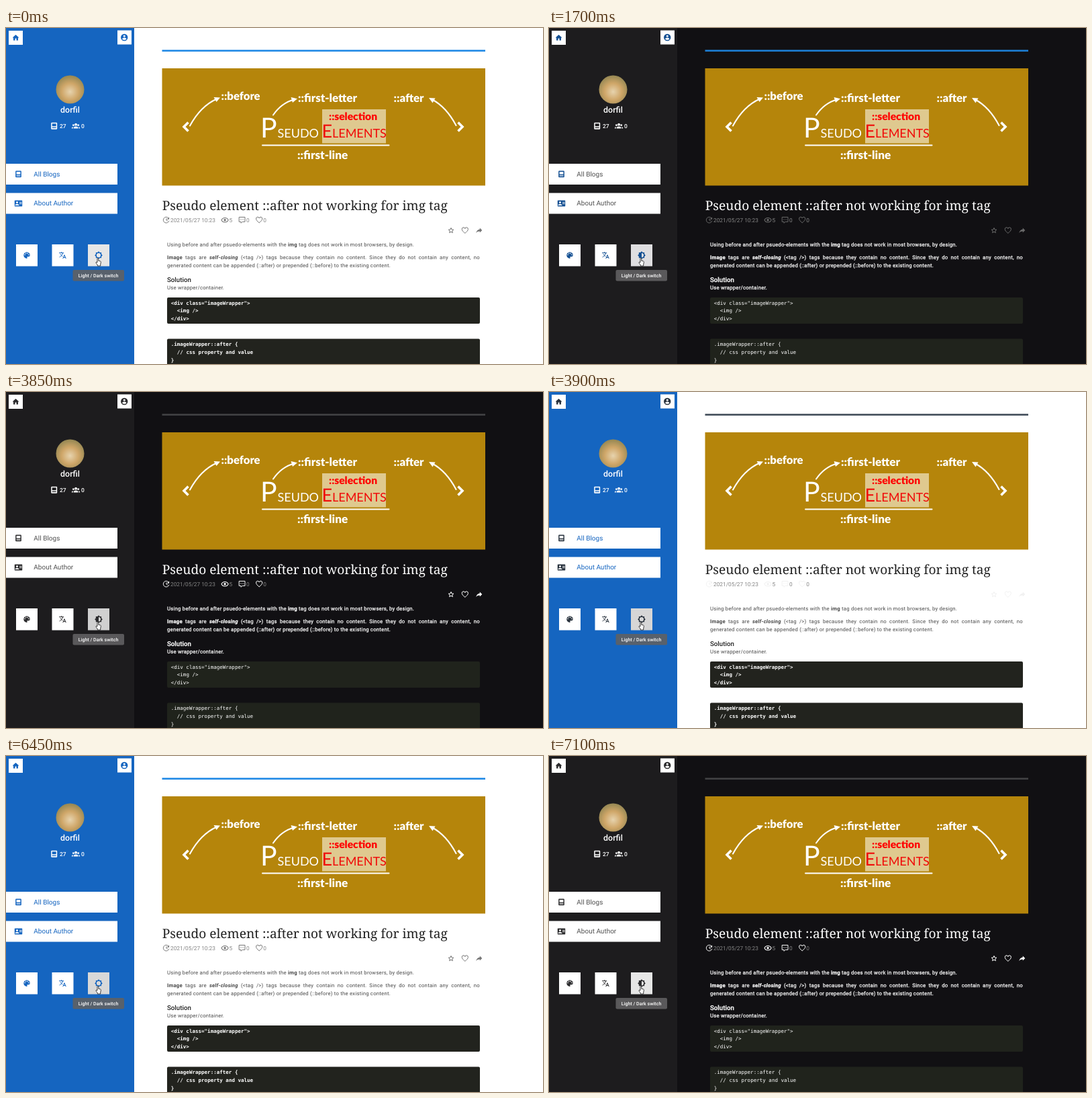
An HTML page that plays this animation: 800x500 px, repeating every 8000 ms.

```html
<!DOCTYPE html>
<html lang="en">
<head>
<meta charset="utf-8">
<title>Blog theme switch</title>
<style>
@property --icon { syntax: '<color>'; inherits: true; initial-value: #1565c0; }
@property --bar { syntax: '<color>'; inherits: true; initial-value: #1e88e5; }
@property --tool { syntax: '<color>'; inherits: true; initial-value: #757575; }
@property --btn { syntax: '<color>'; inherits: true; initial-value: #e6e6e6; }

html, body { margin: 0; width: 100%; height: 100%; overflow: hidden; }
.stage {
  position: relative; width: 800px; height: 500px; overflow: hidden;
  background: var(--page);
  font-family: Roboto, sans-serif;
  text-rendering: geometricPrecision;
  animation: theme 8s step-end infinite, fade 8s linear infinite, press 8s linear infinite;
}
svg { position: absolute; left: 0; top: 0; display: block; }

/* instant part of the switch */
@keyframes theme {
  0%, 48.75% {
    --page: #fff; --side: #1565c0; --menu: #1565c0; --head: #212121;
    --body: #484848; --meta: #858585; --code: #22231e; --tip: #58616c;
    --half: 0; --heavy: 0px; --mono: 700;
  }
  21.25%, 81.875%, 100% {
    --page: #111013; --side: #1d1c1e; --menu: #505050; --head: #fff;
    --body: #fff; --meta: #858585; --code: #20231c; --tip: #5a595b;
    --half: 1; --heavy: .25px; --mono: 400;
  }
}
/* eased part of the switch */
@keyframes fade {
  0%, 21.24% { --icon: #1565c0; --bar: #1e88e5; --tool: #757575; }
  21.25% { --icon: #134f93; --bar: #1d80d8; --tool: #686868; animation-timing-function: cubic-bezier(.25,.8,.5,1); }
  25%, 48.74% { --icon: #2c2c2e; --bar: #424244; --tool: #fff; }
  48.75% { --icon: #29323d; --bar: #3f4a55; --tool: #f2f2f2; animation-timing-function: cubic-bezier(.25,.8,.5,1); }
  52.5%, 81.87% { --icon: #1565c0; --bar: #1e88e5; --tool: #757575; }
  81.875% { --icon: #134f93; --bar: #1d80d8; --tool: #686868; animation-timing-function: cubic-bezier(.25,.8,.5,1); }
  85.625%, 100% { --icon: #2c2c2e; --bar: #424244; --tool: #fff; }
}
/* button press */
@keyframes press {
  0%, 19.3%, 28.1%, 47.4%, 55.6%, 80%, 88.7%, 100% { --btn: #e6e6e6; }
  20.625% { --btn: #d7d7d7; }
  21.25% { --btn: #dfdee0; }
  48.125% { --btn: #d0d0d0; }
  48.75% { --btn: #d6d6d6; }
  80.625% { --btn: #d8d8d8; }
  81.25% { --btn: #d0d0d0; }
  81.875% { --btn: #dcdcdc; }
}

.ico { color: var(--icon); fill: currentColor; }
.tool { color: var(--tool); fill: currentColor; }
.white { color: #fff; fill: #fff; }
.line { fill: none; stroke: currentColor; stroke-width: 2; }
.menu { font-size: 10px; fill: var(--menu); }
.stat { font-size: 8.5px; font-weight: 500; fill: #fff; }
.meta { font-size: 8.3px; fill: var(--meta); }
.title { font: 19.15px 'Noto Serif', serif; fill: var(--head); }
.body, .para { font-size: 7.75px; letter-spacing: .029em; }
.body { fill: var(--body); stroke: var(--body); stroke-width: var(--heavy); }
.head { font-size: 9.7px; font-weight: 500; fill: var(--head); stroke: var(--head); stroke-width: var(--heavy); }
.code { font: 7.54px 'DejaVu Sans Mono', monospace; font-weight: var(--mono); fill: #fff; }
.tag { font-family: Lato, sans-serif; font-weight: 900; fill: #fff; }
.caps { font: 18px Lato, sans-serif; }
.draw { fill: none; stroke: #fff; stroke-width: 2; stroke-linecap: round; }
.para {
  position: absolute; left: 240px; top: 336.4px; width: 466px; line-height: 11.6px;
  color: var(--body); -webkit-text-stroke: var(--heavy) var(--body);
}
.para div { white-space: nowrap; }
.para .full { white-space: normal; height: 11.6px; text-align: justify; text-align-last: justify; }
</style>
</head>
<body>
<div class="stage">
<svg width="800" height="500" viewBox="0 0 800 500">
  <defs>
    <radialGradient id="fur" cx=".5" cy=".58" r=".55">
      <stop offset="0" stop-color="#e6d3ae"/>
      <stop offset=".55" stop-color="#cfa668"/>
      <stop offset="1" stop-color="#9a8a55"/>
    </radialGradient>
    <symbol id="home" viewBox="0 0 24 24"><path d="M10 20V14H14V20H19V12H22L12 3L2 12H5V20Z"/></symbol>
    <symbol id="user" viewBox="0 0 24 24">
      <path fill-rule="evenodd" d="M12 2A10 10 0 0 1 12 22A10 10 0 0 1 12 2M12 5A3 3 0 0 0 12 11A3 3 0 0 0 12 5M12 19.2C14.5 19.2 16.7 17.9 18 16C18 14 14 12.9 12 12.9S6 14 6 16C7.3 17.9 9.5 19.2 12 19.2"/>
    </symbol>
    <symbol id="post" viewBox="0 0 24 24">
      <path fill-rule="evenodd" d="M5 2H19Q21 2 21 4V20Q21 22 19 22H5Q3 22 3 20V4Q3 2 5 2M6 5V13H18V5ZM6 16V18.5H18V16Z"/>
    </symbol>
    <symbol id="card" viewBox="0 0 24 24">
      <path fill-rule="evenodd" d="M2 3H22Q24 3 24 5V19Q24 21 22 21H2Q0 21 0 19V5Q0 3 2 3M8 6A3 3 0 0 0 8 12A3 3 0 0 0 8 6M2 18H14V17C14 15 10 13.9 8 13.9S2 15 2 17ZM15 8V10H22V8ZM15 12V14H22V12Z"/>
    </symbol>
    <symbol id="group" viewBox="0 0 24 24">
      <circle cx="12" cy="8.5" r="3.7"/><circle cx="5" cy="10.3" r="2.7"/><circle cx="19" cy="10.3" r="2.7"/>
      <path d="M5.5 20V18.2C5.5 16 8.4 14.2 12 14.2S18.5 16 18.5 18.2V20ZM0 20V18.5C0 17 1.9 15.9 4.4 15.6Q3.5 16.8 3.5 18.2V20ZM24 20V18.5C24 17 22.1 15.9 19.6 15.6Q20.5 16.8 20.5 18.2V20Z"/>
    </symbol>
    <symbol id="palette" viewBox="0 0 24 24">
      <path d="M12 3A9 9 0 0 0 12 21A1.5 1.5 0 0 0 13.1 18.5A1.5 1.5 0 0 1 14.2 16H16A5 5 0 0 0 21 11C21 6.6 17 3 12 3"/>
      <g fill="#fff"><circle cx="6.5" cy="10.5" r="1.5"/><circle cx="9.5" cy="6.5" r="1.5"/><circle cx="14.5" cy="6.5" r="1.5"/><circle cx="17.5" cy="10.5" r="1.5"/></g>
    </symbol>
    <symbol id="lang" viewBox="0 0 24 24">
      <path class="line" d="M1 5H15M8 2V5M12.5 5C11.5 10 7 14.5 2.5 18M5 8.5C6.5 11.5 9 14 11.5 15.5M12.5 22L17 11L21.5 22M14 18.5H20"/>
    </symbol>
    <symbol id="sun" viewBox="0 0 24 24">
      <path fill-rule="evenodd" d="M20 15.3L23.3 12L20 8.7V4H15.3L12 .7L8.7 4H4V8.7L.7 12L4 15.3V20H8.7L12 23.3L15.3 20H20ZM12 6A6 6 0 0 1 12 18A6 6 0 0 1 12 6"/>
    </symbol>
    <symbol id="update" viewBox="0 0 24 24">
      <path class="line" d="M20.5 14A9 9 0 1 1 18.5 5.8M12.5 7V12.5L16.5 15"/><path d="M21 3V10H14Z"/>
    </symbol>
    <symbol id="eye" viewBox="0 0 24 24">
      <path class="line" d="M2 12C5.5 3.5 18.5 3.5 22 12C18.5 20.5 5.5 20.5 2 12Z"/><circle cx="12" cy="12" r="3.3"/>
    </symbol>
    <symbol id="chat" viewBox="0 0 24 24">
      <path class="line" d="M3 3H21V17H13L9 21V17H3Z"/><path d="M6.5 9H8.5V11H6.5ZM11 9H13V11H11ZM15.5 9H17.5V11H15.5Z"/>
    </symbol>
    <symbol id="heart" viewBox="0 0 24 24">
      <path class="line" d="M12 20C6 14.7 3 12 3 8.5A4.5 4.5 0 0 1 12 6.3A4.5 4.5 0 0 1 21 8.5C21 12 18 14.7 12 20Z"/>
    </symbol>
    <symbol id="star" viewBox="0 0 24 24">
      <path class="line" d="M12 4.4L14.2 9.5L19.7 10L15.5 13.6L16.8 19L12 16.2L7.2 19L8.5 13.6L4.3 10L9.8 9.5Z"/>
    </symbol>
    <symbol id="share" viewBox="0 0 24 24"><path d="M21 12L14 5V9C7 10 4 15 3 20C5.5 16.5 9 14.9 14 14.9V19Z"/></symbol>
  </defs>

  <!-- sidebar -->
  <rect width="191" height="500" fill="var(--side)"/>
  <g fill="#fff">
    <rect x="4" y="4" width="21" height="21"/>
    <rect x="166" y="3.5" width="21" height="21"/>
    <rect y="202" width="166" height="31"/>
    <rect y="245.5" width="166" height="31"/>
    <rect x="15" y="322" width="32" height="32.5"/>
    <rect x="68.5" y="322" width="32" height="32.5"/>
  </g>
  <rect x="122" y="322" width="32" height="32.5" fill="var(--btn)"/>
  <circle cx="95.5" cy="91.5" r="21" fill="url(#fur)"/>
  <text x="95.5" y="125.5" text-anchor="middle" font-size="12.4" font-weight="500" fill="#fff">dorfil</text>
  <g class="white">
    <use href="#post" x="65.7" y="139.7" width="12" height="12"/>
    <use href="#group" x="97.8" y="139.2" width="12.5" height="12.5"/>
  </g>
  <text class="stat" x="80" y="148.5">27</text>
  <text class="stat" x="112" y="148.5">0</text>
  <g class="ico">
    <use href="#home" x="8.5" y="8.5" width="12" height="12"/>
    <use href="#user" x="170" y="7.8" width="12.5" height="12.5"/>
    <use href="#post" x="12.7" y="211.5" width="11.6" height="11.6"/>
    <use href="#card" x="12.5" y="255" width="12" height="12"/>
    <use href="#palette" x="24.7" y="332" width="12.5" height="12.5"/>
    <use href="#lang" x="78.5" y="332.2" width="12" height="12"/>
    <use href="#sun" x="131.8" y="332" width="12.4" height="12.4"/>
    <rect x="134.6" y="334.8" width="3.4" height="6.8" style="opacity:var(--half)"/>
  </g>
  <text class="menu" x="41.3" y="220.8">All Blogs</text>
  <text class="menu" x="41.3" y="264.3">About Author</text>
  <rect x="99.5" y="360" width="76.5" height="16.5" rx="2" fill="var(--tip)"/>
  <text x="107.8" y="370.6" font-size="7.1" font-weight="500" fill="#fff">Light / Dark switch</text>
  <path d="M136 349V343.3Q136 342.3 136.9 342.3T137.8 343.3V346.3L140.5 347Q141.5 347.3 141.4 348.5L140.7 352V354H136.3V352.5L134 349.5Q133.8 348.2 135 348.3Z" fill="#fff" stroke="#111" stroke-width=".8" stroke-linejoin="round"/>

  <!-- banner -->
  <rect x="232.5" y="32.5" width="481.5" height="2.6" fill="var(--bar)"/>
  <rect x="232.5" y="60" width="481.5" height="174.5" fill="#b5850b"/>
  <rect x="471" y="121" width="95" height="50.5" fill="#dfc98f"/>
  <g class="draw">
    <path stroke-width="3.6" stroke-linecap="butt" d="M271.5 140.5L265 147L271.5 153.5M673.5 140.5L680 147L673.5 153.5"/>
    <path d="M274 145.5C283 129 295 114 314 105.5M398 129.5C406 118 416 110 429 106.5M670.5 145C662 129 651 115 635 106.5"/>
    <path d="M382 174.5H570.5"/>
  </g>
  <g fill="#fff">
    <path d="M319 103.5L309.5 103L313.5 110Z"/>
    <path d="M434 105.3L424.5 103L427 111Z"/>
    <path d="M630 104L635.5 111.5L639.5 104.5Z"/>
  </g>
  <g class="tag">
    <text x="320.5" y="106.500" font-size="16.7">::before</text>
    <text x="435" y="110" font-size="17">::first-letter</text>
    <text x="577.5" y="110" font-size="16.8">::after</text>
    <text x="434" y="195" font-size="17.2">::first-line</text>
    <text x="481" y="136.5" font-size="15.6" fill="#f00">::selection</text>
  </g>
  <g class="caps" fill="#fff">
    <text x="379" y="163" font-size="41">P</text>
    <text x="404.5" y="163">SEUDO</text>
    <g fill="#f00a08">
      <text x="470.5" y="163" font-size="27">E</text>
      <text x="486" y="163">LEMENTS</text>
    </g>
  </g>

  <!-- article -->
  <text class="title" x="232.8" y="271">Pseudo element ::after not working for img tag</text>
  <g class="tool">
    <use href="#update" x="233" y="280" width="11.6" height="11.6"/>
    <use href="#eye" x="320" y="279.7" width="12.2" height="12.2"/>
    <use href="#chat" x="345.7" y="280" width="11.8" height="11.8"/>
    <use href="#heart" x="371.2" y="279.9" width="12" height="12"/>
    <use href="#star" x="657" y="295.2" width="12" height="12"/>
    <use href="#heart" x="677.8" y="295.4" width="12" height="12"/>
    <use href="#share" x="698.8" y="295" width="12" height="12"/>
  </g>
  <g class="meta">
    <text x="245" y="288.7">2021/05/27 10:23</text>
    <text x="332.5" y="288.7">5</text>
    <text x="358" y="288.7">0</text>
    <text x="383.3" y="288.7">0</text>
  </g>
  <text class="body" x="240" y="325.2">Using before and after psuedo-elements with the <tspan font-weight="700">img</tspan> tag does not work in most browsers, by design.</text>
  <text class="head" x="240" y="377.6">Solution</text>
  <text class="body" x="240" y="389.3">Use wrapper/container.</text>
  <rect x="240" y="401" width="466" height="39" rx="2" fill="var(--code)"/>
  <rect x="240" y="462.5" width="466" height="45" rx="2" fill="var(--code)"/>
  <g class="code">
    <text x="245.7" y="411.7">&lt;div class="imageWrapper"&gt;</text>
    <text x="254.8" y="423.3">&lt;img /&gt;</text>
    <text x="245.7" y="434.9">&lt;/div&gt;</text>
    <text x="245.7" y="473.3">.imageWrapper::after {</text>
    <text x="254.8" y="484.9">// css property and value</text>
    <text x="245.7" y="496.5">}</text>
  </g>
</svg>
<div class="para">
  <div class="full"><b>Image</b> tags are <b><i>self-closing</i></b> (&lt;tag /&gt;) tags because they contain no content. Since they do not contain any content, no</div>
  <div>generated content can be appended (::after) or prepended (::before) to the existing content.</div>
</div>
</div>
</body>
</html>
```
